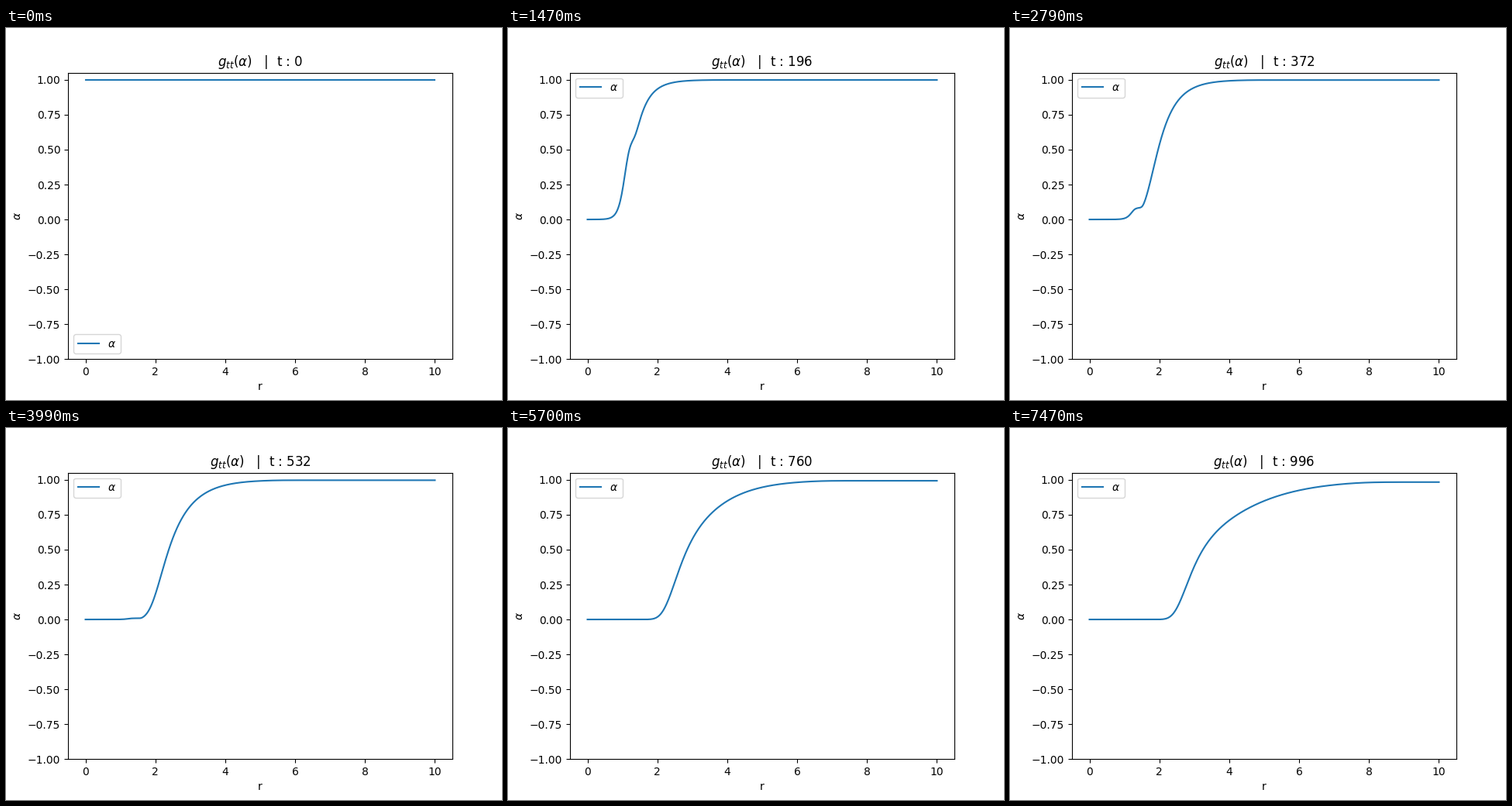
A matplotlib script for the animation above (7.5 s loop, 640 by 480 pixels).

```python
import numpy as np
import matplotlib.pyplot as plt
from matplotlib.animation import FuncAnimation

FRAMES = 250
STEPS_PER_FRAME = 4
ONSET = 112  # step at which the centre has collapsed


def soft_max(a, b, sharp=5):
    return np.logaddexp(sharp * a, sharp * b) / sharp


def outer_front(r, t):
    """Logit of the main front, which slows and flattens as it moves out."""
    u = np.log(t / ONSET)
    slope = 2.75 / (1 + (t / 640) ** 2.1)
    centre = 0.25 + 1.1 * u + 0.025 * u**2
    edge = 1 + 0.354 * (np.cbrt(t) - np.cbrt(ONSET))
    return slope * (r - centre) - np.exp(-2.4 * (r - edge))


def inner_shelf(r, t):
    """Logit of the sinking shelf that leaves a kink near r = 1.3."""
    fade = np.exp(-(t - ONSET) / 70)
    level = 1.4 - 0.0146 * (t - ONSET) + 0.44 * fade
    edge = 1.25 - 0.25 * fade
    width = 0.05 * (1 + fade)
    slope = 10 - 2.7 * fade
    return level - slope * width * np.logaddexp(0, (edge - r) / width)


def lapse(r, step):
    t = max(step, ONSET)
    x = soft_max(outer_front(r, t), inner_shelf(r, t))
    x = -soft_max(-x, 0.0039 * t - 8)  # far-field ceiling
    growth = min(1, step / ONSET) ** 2.3
    return np.exp(-growth * np.logaddexp(0, -x))


r = np.linspace(0, 10, 501)

fig, ax = plt.subplots(figsize=(6.4, 4.8), dpi=100)
line, = ax.plot(r, lapse(r, 0), label=r"$\alpha$")
ax.set(xlim=(-0.5, 10.5), ylim=(-1, 1.0517), xlabel="r", ylabel=r"$\alpha$")
title = ax.set_title("")
ax.legend(loc="best")  # moves up once the curve clears the corner


def update(i):
    step = STEPS_PER_FRAME * i
    line.set_ydata(lapse(r, step))
    title.set_text(rf"$g_{{tt}}(\alpha)$   |  t : {step}")
    return line, title


anim = FuncAnimation(fig, update, frames=FRAMES, init_func=lambda: update(0),
                     interval=30, repeat=True, repeat_delay=0)
plt.show()
```
